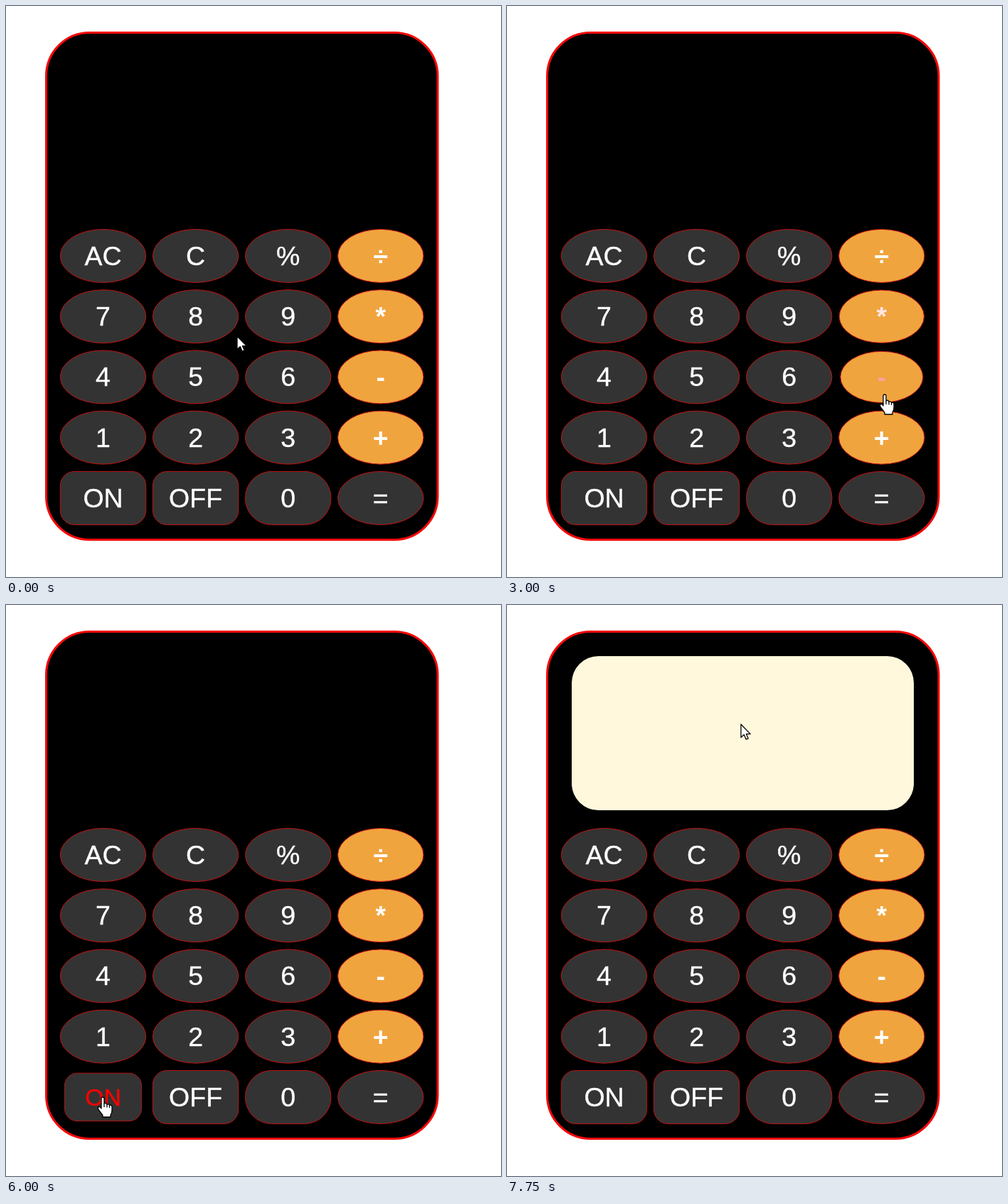
Recreate the animation shown at these times as an HTML page. Size 696 px wide and 804 px high, loop 8000 ms.

```html
<!DOCTYPE html>
<html lang="en">
<head>
<meta charset="utf-8">
<title>Calculator</title>
<style>
  html, body { margin: 0; width: 100%; height: 100%; overflow: hidden; background: #fff; }
  svg { display: block; }
  text {
    font: 37.5px Arial, "Liberation Sans", sans-serif; text-anchor: middle;
    fill: currentColor; stroke: currentColor; stroke-width: 0.4;
  }
  .op text { font-weight: bold; stroke: none; }
  rect { fill: #333; }
  .op rect { fill: #f0a43e; }
</style>
</head>
<body>
<svg id="stage" width="696" height="804" viewBox="0 0 696 804">
  <rect x="56.5" y="37.5" width="550.5" height="714" rx="61" style="fill:#000" stroke="#f60808" stroke-width="3"/>
  <rect id="screen" x="91" y="72" width="481" height="217" rx="37.5" style="fill:cornsilk" opacity="0"/>
  <g id="keys"></g>
  <g id="cursor" fill="#fff" stroke="#000" stroke-width="1.3" stroke-linejoin="round">
    <path id="arrow" d="M0 0V18.5L4.3 14.6L7.2 21.2L10.2 19.9L7.4 13.6H13.2Z"/>
    <g id="hand">
      <path d="M-2 2Q-2 0 0 0T2 2V9Q3.5 7.5 5.5 9L6 10.5Q8.5 9 9.5 11.5Q12 10.5 13 13V19Q13 22 11 25V28H0V25.5L-6 17.5Q-7.5 15 -5.5 13.5Q-4 13 -2 16Z"/>
      <path d="M2 9V14M6 10.5V14.5M9.5 11.5V15" fill="none"/>
    </g>
  </g>
</svg>
<script>
const LOOP = 8000, STEP = 250, FADE = 300, TICK = 10;
const SCREEN_ON = 6205, SCREEN_FADE = 600;
const ROWS = ['AC C % ÷', '7 8 9 *', '4 5 6 -', '1 2 3 +', 'ON OFF 0 ='];
const RX = 60.2, RY = 37.5;
const RADIUS = { ON: 20, OFF: 20, 0: 37 };

// pointer turning points: time, x, y
const ROUTE = [
  [0, 325, 465], [700, 140, 430], [1250, 130, 352], [1950, 466, 350],
  [2000, 539, 347], [2400, 537, 440], [2930, 533, 484], [3000, 531, 547],
  [3600, 420, 640], [3750, 520, 640], [4125, 459, 690], [4250, 395, 690],
  [4800, 136, 693], [7460, 136, 693], [7500, 372, 262], [7750, 329, 168],
  [LOOP, 329, 168]
];

const $ = id => document.getElementById(id);
const bez = (a, b, u) => 3 * a * u * (1 - u) ** 2 + 3 * b * u * u * (1 - u) + u ** 3;

// the CSS "ease" curve
function ease(x) {
  if (x <= 0) return 0;
  if (x >= 1) return 1;
  let lo = 0, hi = 1;
  for (let i = 0; i < 24; i++) {
    const mid = (lo + hi) / 2;
    if (bez(0.25, 0.25, mid) < x) lo = mid; else hi = mid;
  }
  return bez(0.1, 1, lo);
}

function add(parent, tag, attrs) {
  const el = document.createElementNS('http://www.w3.org/2000/svg', tag);
  for (const name in attrs) el.setAttribute(name, attrs[name]);
  return parent.appendChild(el);
}

const keys = ROWS.flatMap((row, r) => row.split(' ').map((name, c) => {
  const x = 136.5 + 130.1 * c, y = 351.9 + 85.25 * r;
  const g = add($('keys'), 'g', { class: c === 3 && r < 4 ? 'op' : '' });
  add(g, 'rect', {
    x: -RX, y: -RY, width: 2 * RX, height: 2 * RY,
    rx: RADIUS[name] || RX, ry: RADIUS[name] || RY, stroke: '#c41212'
  });
  add(g, 'text', { y: 13 }).textContent = name;
  return { x, y, g };
}));

function pointerAt(t) {
  const i = ROUTE.findIndex(p => p[0] > t);
  const [t0, x0, y0] = ROUTE[i - 1], [t1, x1, y1] = ROUTE[i];
  const k = (t - t0) / (t1 - t0);
  return [x0 + (x1 - x0) * k, y0 + (y1 - y0) * k];
}

const isOver = (key, [x, y]) => Math.hypot((x - key.x) / RX, (y - key.y) / RY) < 1;

// replay the recent pointer path to find how far a key's hover fade has got
function hoverLevel(key, t) {
  let p = 0, over = false;
  for (let s = Math.max(0, t - 3 * FADE); s <= t; s += TICK) {
    over = isOver(key, pointerAt(s));
    p = Math.min(1, Math.max(0, p + (over ? TICK : -TICK) / FADE));
  }
  return over ? ease(p) : 1 - ease(1 - p);
}

function draw(t) {
  for (const key of keys) {
    const level = hoverLevel(key, t), tint = Math.round(255 * (1 - level));
    key.g.setAttribute('transform', `translate(${key.x} ${key.y}) scale(${1 - 0.1 * level})`);
    key.g.style.color = `rgb(255,${tint},${tint})`;
  }
  $('screen').setAttribute('opacity', ease((t - SCREEN_ON) / SCREEN_FADE));

  const tip = pointerAt(t), over = keys.some(key => isOver(key, tip));
  $('hand').style.display = over ? '' : 'none';
  $('arrow').style.display = over ? 'none' : '';
  $('cursor').setAttribute('transform', `translate(${tip})`);
}

let shown = -1;
function tick() {
  const t = Math.floor(performance.now() % LOOP / STEP) * STEP;
  if (t !== shown) draw(shown = t);
  requestAnimationFrame(tick);
}
tick();
</script>
</body>
</html>
```
